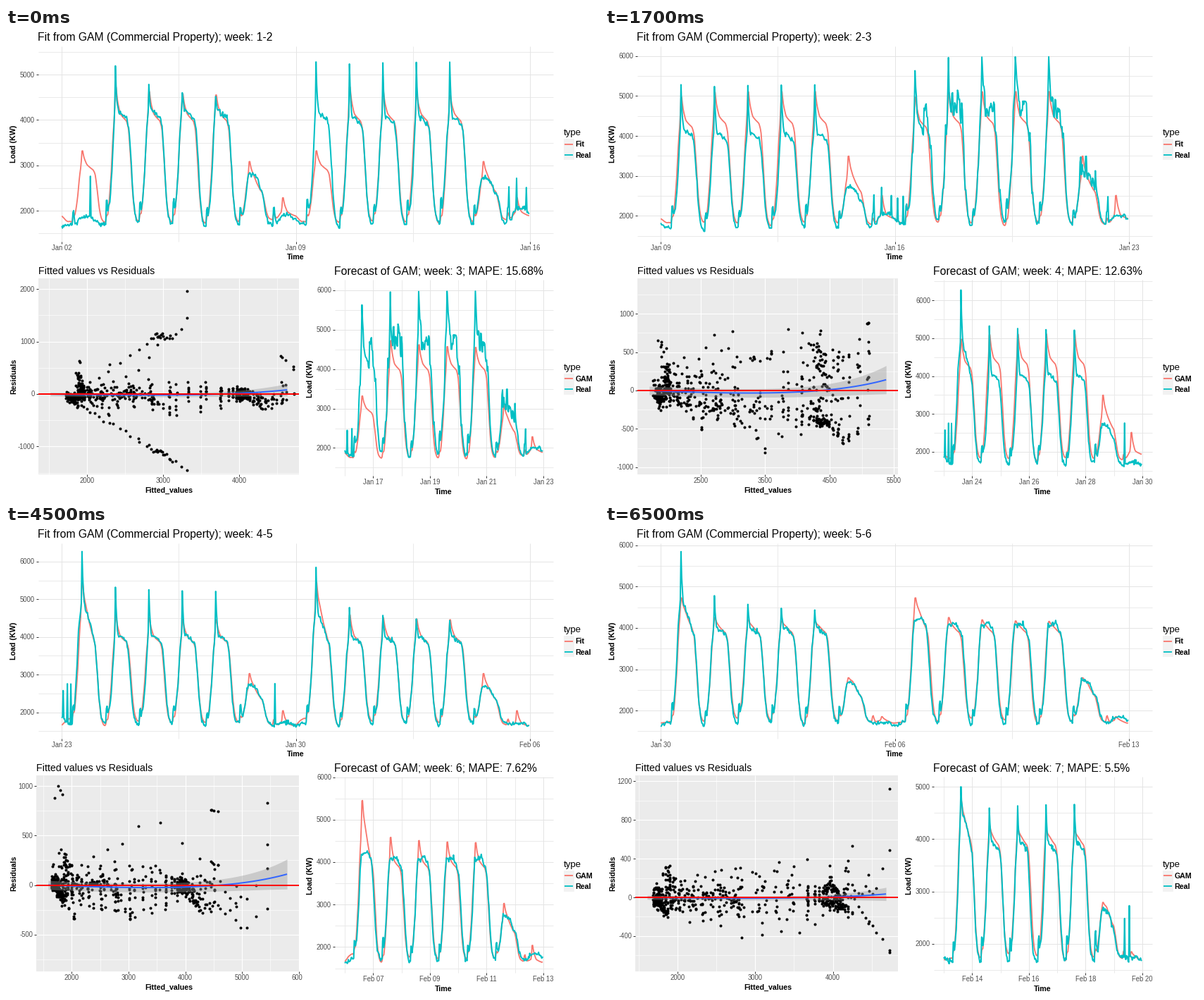
Recreate the animation shown at these times as a matplotlib script. Size 842 by 665 pixels, loop 8 s.

```python
import numpy as np
import matplotlib.pyplot as plt
from matplotlib.animation import FuncAnimation
from matplotlib.patches import Rectangle

W, H = 842, 665
CORAL, TEAL = "#F8766D", "#00BFC4"
PER_DAY = 48
WEEK = 7 * PER_DAY
PEAK = 29 / PER_DAY  # time of the daily peak
BASE_LOW = 1690      # night load
UNREST_WEEK = 2      # the week with jumpy afternoons

plt.rcParams["font.family"] = "Liberation Sans"

# Monday plateau, weekday plateau, Sunday load,
# height of the peak above the plateau on Monday and late in the week
WEEKS = np.array([
    [1860, 4200, 1900, 1900, 250],
    [4180, 4080, 2050, 1100, 1200],
    [4600, 4900, 2000, 1030, 1080],
    [4850, 4050, 1720, 1420, 1150],
    [4600, 4000, 1700, 1250, 400],
    [4180, 4080, 1830, 0, 0],
    [4450, 3950, 1750, 550, 720]])

# Moments, in days, when something switches on outside working hours
STRAYS = (.86, 13.37, 13.6, 13.89, 14.09, 14.26, 20.37,
          21.05, 21.16, 21.28, 27.37, 48.38, 48.55)

# Axis ranges of the three panels, residual ticks, final rise of the smoother
SCENES = [
    dict(mape=15.68, top=(1512, 5435), right=(1519, 6041), x=(1517, 4631),
         y=(-1363, 2035), x_tick=2000, y_step=1000, rise=80),
    dict(mape=12.63, top=(1579, 6025), right=(1602, 6305), x=(1700, 5377),
         y=(-976, 1343), x_tick=2500, y_step=500, rise=140),
    dict(mape=14.43, top=(1583, 6277), right=(1539, 5868), x=(1671, 5592),
         y=(-1054, 1276), x_tick=2000, y_step=500, rise=100),
    dict(mape=7.62, top=(1534, 6260), right=(1603, 5799), x=(1584, 5795),
         y=(-782, 1017), x_tick=2000, y_step=500, rise=110),
    dict(mape=5.5, top=(1532, 5844), right=(1618, 5020), x=(1610, 4684),
         y=(-672, 1167), x_tick=2000, y_step=400, rise=35),
]


def week_days(monday, plateau, sunday, first_peak, later_peak):
    """Plateau start, plateau end and peak height of the seven days."""
    start = np.full(7, plateau, float)
    start[[0, 5, 6]] = monday, .67 * plateau, sunday
    end = .96 * np.minimum(start, 1.03 * plateau)
    end[5] *= .92
    peak = later_peak + (first_peak - later_peak) * .45 ** np.arange(7)
    return start, end, peak * (start > 3500)


def day_curve(start, end, peak, low, bump, tail, shift):
    """Piecewise linear load; shift holds the rise and fall delay of each day."""
    times, values = [0], [low[0]]
    for d, (a, b, p, l) in enumerate(zip(start, end, peak, low)):
        after = low[(d + 1) % len(low)]
        rise, fall = shift[d]
        swell = .03 * a if p < 100 else 0
        keys = [(.25, l + 20), (.32, l), (.34, l + bump[d]), (.37, l + .4 * bump[d])]
        keys += [(t + rise, l + f * (a - l))
                 for t, f in ((.42, .2), (.48, .46), (.53, .8))]
        keys += [(.582, a), (PEAK, a + p), (PEAK + .4 * tail, a + .4 * p),
                 (PEAK + tail, a), (.83, (a + b) / 2 + swell), (.94, b)]
        keys += [(t + fall, after + f * (b - after))
                 for t, f in ((1, .92), (1.06, .62), (1.12, .27), (1.18, .08))]
        times += [d + t for t, _ in keys]
        values += [v for _, v in keys]
    return np.interp(np.arange(len(low) * PER_DAY) / PER_DAY, times, values)


def make_real():
    rng = np.random.default_rng(4)
    start, end, peak = np.hstack([week_days(*row) for row in WEEKS])
    days = len(start)
    restless = np.arange(days) // 7 == UNREST_WEEK
    low = BASE_LOW + 130 * restless + rng.normal(0, 30, days)
    bump = rng.uniform(450, 800, days) * (start > 1845)
    shift = np.clip(rng.normal(0, .016, (days, 2)), -.03, .03)
    load = day_curve(start, end, peak, low, bump, .07, shift)

    busy = load > BASE_LOW + 1100
    rough = np.repeat(np.where(restless, 450, 40), PER_DAY)
    steps = np.repeat(rng.uniform(-1, .8, len(load) // 2), 2)
    at_peak = np.arange(len(load)) % PER_DAY == round(PEAK * PER_DAY)
    load += np.where(busy & ~at_peak, steps * rough, 0)
    load += np.where(at_peak, 0, rng.normal(0, 25, len(load)))
    for t in STRAYS:
        load[round(t * PER_DAY)] = BASE_LOW + rng.uniform(750, 1100)
    return load


def make_fit(i):
    """Weekly pattern of the model: the mean of two weeks, with softer peaks."""
    rng = np.random.default_rng(i)
    pair = WEEKS[i:i + 2]
    start, end, peak = np.mean([week_days(*row) for row in pair], axis=0)
    peak *= .7
    peak[5:] = .55 * pair[:, 4].mean()
    low = BASE_LOW + 50 + rng.normal(0, 40, 7)
    if UNREST_WEEK in (i, i + 1):
        low += 65
    parts = [np.tile(p, 3) for p in (start, end, peak, low, np.full(7, 250))]
    load = day_curve(*parts, .14, np.zeros((21, 2)))
    load = np.convolve(load, [.2, .6, .2], "same")
    return load[WEEK:2 * WEEK]


REAL = make_real()
FITS = [make_fit(i) for i in range(len(SCENES))]

fig = plt.figure(figsize=(W / 72, H / 72), dpi=72, facecolor="white")
ax = fig.add_axes([0, 0, 1, 1])


def span(lo, hi, start, end):
    """Map data to pixels with a margin of 5 % of the range on both sides."""
    margin = .05 * (hi - lo)
    k = (end - start) / (hi - lo + 2 * margin)
    return lambda v: start + k * (np.asarray(v) - lo + margin)


def ticks(first, step, to_px, lo, hi):
    values = first + step * np.arange(-20, 21)
    return [v for v in values if lo <= to_px(v) <= hi]


def label(x, y, s, size=9.5, color="black", **kw):
    return ax.text(x, y, s, fontsize=size, color=color, **kw)


def bold(x, y, s, **kw):
    return label(x, y, s, 10.6, weight="bold", **kw)


def side_title(x, y, s):
    bold(x, y, s, rotation=90, ha="center", va="center")


def line(x, y, color, width=1.0, **kw):
    ax.plot(x, y, color=color, lw=width, solid_capstyle="butt", **kw)


def y_tick(left, y, value):
    line([left - 3, left], [y, y], "#333333")
    label(left - 5, y + 3.5, f"{value:g}", color="#4D4D4D", ha="right")


def x_tick(x, bottom, text):
    line([x, x], [bottom, bottom + 2.5], "#333333")
    return label(x, bottom + 12, text, color="#4D4D4D", ha="center")


def date_label(day):
    return f"Jan {day:02d}" if day <= 31 else f"Feb {day - 31:02d}"


def legend(y, names):
    label(791.5, y, "type", 13.2)
    ax.add_patch(Rectangle((791.5, y + 5), 15, 30, color="#F2F2F2", lw=0))
    for row, (name, color) in enumerate(zip(names, (CORAL, TEAL))):
        mid = y + 12.5 + 15 * row
        line([793, 805], [mid, mid], color, 1.8)
        bold(808.5, mid + 4, name)


def load_panel(box, limits, first_day, major, minor, fit, real):
    left, right, top, bottom = box
    to_y = span(*limits, bottom, top)
    to_x = span(0, len(real) / PER_DAY, left, right)
    for v in ticks(1500, 1000, to_y, top, bottom):
        line([left, right], [to_y(v)] * 2, "#EAEAEA")
    for d in minor:
        line([to_x(d)] * 2, [top, bottom], "#EAEAEA")
    for v in ticks(2000, 1000, to_y, top, bottom):
        line([left, right], [to_y(v)] * 2, "#E4E4E4")
        y_tick(left, to_y(v), v)
    for d in major:
        line([to_x(d)] * 2, [top, bottom], "#E4E4E4")
        x_tick(to_x(d), bottom, date_label(first_day + d))
    x = to_x(np.arange(len(real)) / PER_DAY)
    line(x, to_y(fit), CORAL, 1.8)
    line(x, to_y(real), TEAL, 2)


def residual_panel(scene, fit, residual):
    step, x_first = scene["y_step"], scene["x_tick"]
    left = 46 if scene["x"][0] + scene["y"][0] > 300 else 43
    left = 43 if scene["y"][0] > -900 else 46
    right, top, bottom = 416, 355, 633
    to_x = span(*scene["x"], left, right)
    to_y = span(*scene["y"], bottom, top)
    zero = to_y(0)
    ax.add_patch(Rectangle((left, top), right - left, bottom - top,
                           color="#EBEBEB", lw=0))
    for offset, width in ((.5, .6), (0, 1.1)):
        for v in ticks(x_first + 1000 * offset, 1000, to_x, left, right):
            line([to_x(v)] * 2, [top, bottom], "white", width)
        for v in ticks(step * offset, step, to_y, top, bottom):
            line([left, right], [to_y(v)] * 2, "white", width)
    cell = Rectangle((0, 0), 421, H, transform=ax.transData)
    for v in ticks(x_first, 1000, to_x, left, right):
        text = x_tick(to_x(v), bottom, f"{v:g}")
        text.set_clip_path(cell)
        text.set_clip_on(True)
    for v in ticks(0, step, to_y, top, bottom):
        y_tick(left, to_y(v), v)

    x, y = to_x(fit), to_y(residual)
    inside = (x > left + 5) & (x < right - 5) & (y > top + 5) & (y < bottom - 5)
    ax.plot(x[inside], y[inside], "o", ms=4, mew=0, color="black")

    rise = scene["rise"]
    edge = 30 + 1.1 * rise
    s = np.linspace(0, 1, 80)
    x = to_x(scene["x"][0] + s * np.ptp(scene["x"]))
    curve = rise * (s**5 - s * (1 - s))
    half = edge * (.3 + .7 * s**6)
    ax.fill_between(x, to_y(curve - half), to_y(curve + half),
                    color="#999999", alpha=.4, lw=0, zorder=2.5)
    line(x, to_y(curve), "#3366FF", 2, zorder=2.6)
    line([left, right], [zero, zero], "red", 2, zorder=2.7)
    label(left, 349, "Fitted values vs Residuals", 14.1)
    bold(231, 659, "Fitted_values", ha="center")
    side_title(11, 494, "Residuals")


def draw_scene(i):
    scene, fit = SCENES[i], FITS[i]
    two_fit = np.tile(fit, 2)
    two_real = REAL[i * WEEK:(i + 2) * WEEK]
    next_real = REAL[(i + 2) * WEEK:(i + 3) * WEEK]
    first_day = 2 + 7 * i

    load_panel((46, 777, 25.5, 303), scene["top"], first_day,
               (0, 7, 14), (3.5, 10.5), two_fit, two_real)
    label(45, 18, f"Fit from GAM (Commercial Property); week: {i + 1}-{i + 2}", 15.8)
    bold(411.5, 328, "Time", ha="center")
    side_title(11, 164, "Load (KW)")
    legend(152, ("Fit", "Real"))

    residual_panel(scene, two_fit, two_real - two_fit)

    load_panel((467, 777, 357, 635), scene["right"], first_day + 14,
               (1, 3, 5, 7), (0, 2, 4, 6), fit, next_real)
    label(466, 350, f"Forecast of GAM; week: {i + 3}; MAPE: {scene['mape']:g}%", 15.8)
    bold(621.5, 661, "Time", ha="center")
    side_title(432, 497, "Load (KW)")
    legend(484.5, ("GAM", "Real"))


def update(frame):
    ax.clear()
    ax.axis("off")
    ax.set(xlim=(0, W), ylim=(H, 0))
    ax.set_autoscale_on(False)
    draw_scene((frame + 3) // 4)
    return []


anim = FuncAnimation(fig, update, frames=16, interval=500,
                     init_func=lambda: [], repeat=True, repeat_delay=0)
plt.show()
```
